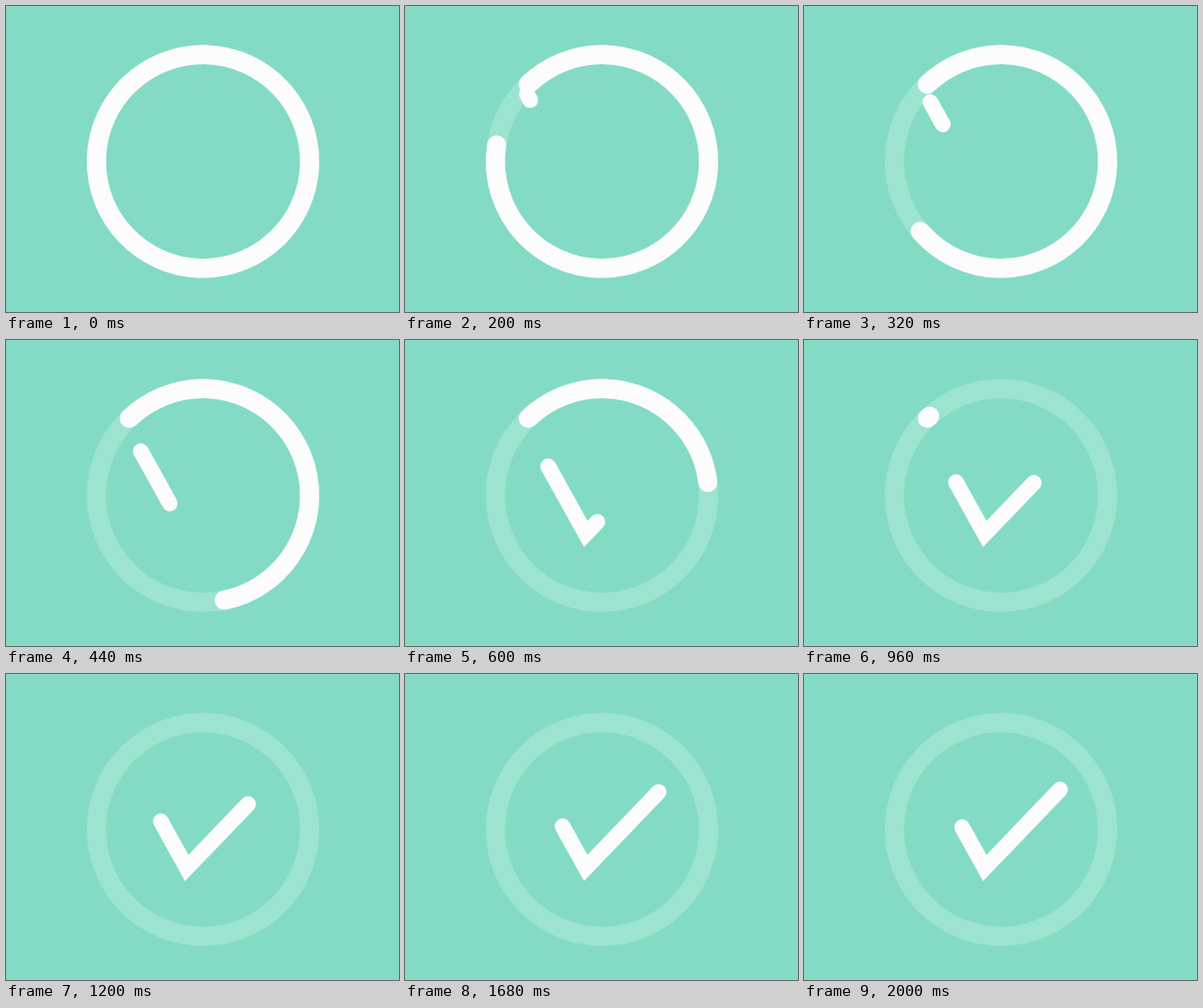
These frames come from a looping animation (399x310 px, 3320 ms). An HTML page:

```html
<!DOCTYPE html>
<html lang="en">
<head>
<meta charset="utf-8">
<title>Check</title>
<style>
  html, body { margin: 0; width: 100%; height: 100%; overflow: hidden; background: #83dbc5; }
  svg { display: block; width: 100%; height: 100%; fill: none; stroke: #fcfcfc; }
</style>
</head>
<body>
<svg viewBox="0 0 399 310">
  <g stroke-width="19.5">
    <circle cx="200" cy="157.5" r="108.25" stroke="#9ce4d0"/>
    <circle id="ring" cx="200" cy="157.5" r="108.25" pathLength="360" stroke-linecap="round"
            transform="rotate(226.3 200 157.5)"/>
  </g>
  <path id="check" d="M122 86L183.5 196.5L260 117" pathLength="1000" stroke-width="16"
        stroke-linecap="round" stroke-linejoin="miter"/>
</svg>
<script>
const LOOP = 3320, STEP = 40, SETTLED = 2000;
const RING_TIME = 1000, CHECK_TIME = 2090;
const ring = document.getElementById('ring');
const check = document.getElementById('check');

const smooth = s => s * s * (3 - 2 * s);

// Equivalent to cubic-bezier(x1, 0, 0, 1), solved by bisection.
function sharpEaseOut(x, x1 = 0.32) {
  let low = 0, high = 1;
  for (let i = 0; i < 30; i++) {
    const s = (low + high) / 2;
    if (3 * (1 - s) ** 2 * s * x1 + s ** 3 < x) low = s; else high = s;
  }
  return smooth(low);
}

// Shows only the part of a stroke between two distances along it.
function trim(shape, from, to) {
  const visible = to - from > 1e-3;
  shape.style.visibility = visible ? 'visible' : 'hidden';
  if (!visible) return;
  shape.setAttribute('stroke-dasharray', `${to - from} 2000`);
  shape.setAttribute('stroke-dashoffset', -from);
}

function draw(time) {
  const t = Math.min(time, SETTLED);
  trim(ring, 0, 360 * (1 - smooth(Math.min(t / RING_TIME, 1))));
  const p = t > 0 ? sharpEaseOut(t / CHECK_TIME) : 0;
  trim(check, 335 * p, 1000 * p);
}

const start = performance.now();
function tick() {
  // The motion advances in steps; the small lead absorbs display timing jitter.
  const elapsed = performance.now() - start + 8;
  draw(Math.floor((elapsed % LOOP) / STEP) * STEP);
  requestAnimationFrame(tick);
}
tick();
</script>
</body>
</html>
```
